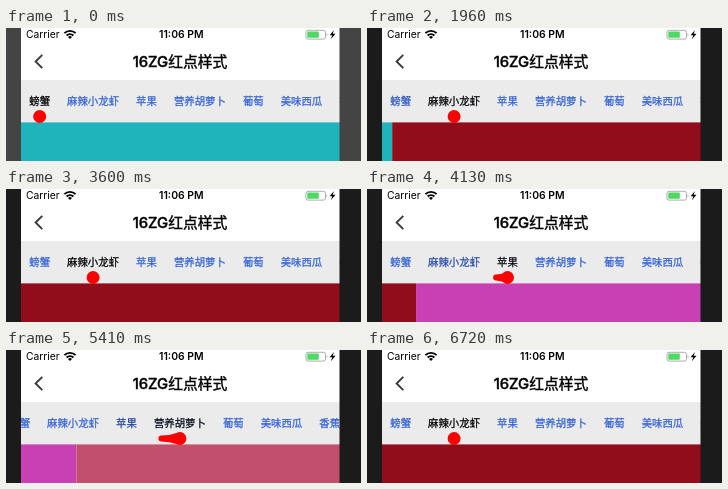
Animation, 355 px wide and 133 px high, one loop 7.26 s. Source, as an HTML page:

```html
<!DOCTYPE html>
<html lang="zh-CN">
<head>
<meta charset="utf-8">
<title>Tab dot</title>
<style>
html, body { margin: 0; width: 100%; height: 100%; overflow: hidden; }
svg { display: block; }
text { font-family: Inter, "Noto Sans CJK SC", "Noto Sans CJK JP", sans-serif; }
#tabs text { font-size: 10.4px; font-weight: 500; stroke-width: .25px; }
#title { font-size: 14.8px; font-weight: 500; stroke: #000; stroke-width: .4px; }
</style>
</head>
<body>
<svg width="355" height="133" viewBox="0 0 355 133">
  <rect width="355" height="133" fill="#fff"/>
  <rect x="15" y="52" width="319" height="43" fill="#ebebeb"/>
  <g id="pages"></g>
  <g id="tabs"></g>
  <path id="dot" fill="#f00"/>

  <text x="20" y="10.3" font-size="10.3">Carrier</text>
  <path d="M58.4 5.2a7.8 7.8 0 0 1 11.2 0M60.6 7.5a4.8 4.8 0 0 1 6.8 0"
    fill="none" stroke="#000" stroke-width="1.9"/>
  <path d="M64 11l-2-2.1a2.9 2.9 0 0 1 4 0z"/>
  <text x="175.3" y="10.3" font-size="10.4" font-weight="600" text-anchor="middle">11:06 PM</text>
  <rect x="300" y="2.3" width="19.5" height="8.8" rx="2" fill="#fff" stroke="#999" stroke-width=".8"/>
  <rect x="301.3" y="3.6" width="11.5" height="6.2" rx=".8" fill="#4cd964"/>
  <path d="M320.7 5.2q1.6 1.5 0 3z" fill="#999"/>
  <path d="M328 2l-4.4 5.2h2.7l-1.5 4 4.7-5.5h-2.8z"/>

  <path d="M36.3 26.8l-6.7 6.7 6.7 6.7" fill="none" stroke="#3a3a3a" stroke-width="1.9"/>
  <text id="title" x="174" y="39" text-anchor="middle">16ZG红点样式</text>

  <path id="sides" d="M0 0h15v133H0zM333.5 0H355v133h-21.5z"/>
</svg>
<script>
const LOOP = 7260, STEP = 30, LEFT = 15, WIDTH = 319, TOP = 94.4;
const DOT_Y = 88.5, R = 6.5, FONT = 10.4, GAP = 17;
const labels = ["螃蟹", "麻辣小龙虾", "苹果", "营养胡萝卜", "葡萄", "美味西瓜", "香蕉"];
const colors = ["#1fb4bb", "#920d1c", "#c840b4", "#c2506d"];

// Drags and releases: [start, end, position reached]
const swipes = [
  [1410, 1550, .508], [1745, 2020, 1],
  [2290, 2730, 1.365], [2730, 3180, 1],
  [3600, 3780, 1.389], [3915, 4250, 2],
  [4440, 4600, 2.5], [4755, 5080, 3],
  [5350, 5900, 2], [6210, 6700, 1]
];
const scrolls = [[5050, 5350, 20], [5850, 6080, 0]];

const $ = id => document.getElementById(id);
const clamp = v => Math.max(0, Math.min(1, v));
const easeOut = s => 1 - (1 - s) ** 2;
const follow = (moves, t) => moves.reduce((v, [start, end, to]) =>
  v + (to - v) * easeOut(clamp((t - start) / (end - start))), 0);

function add(parent, tag, attrs) {
  const el = document.createElementNS("http://www.w3.org/2000/svg", tag);
  for (const name in attrs) el.setAttribute(name, attrs[name]);
  return parent.appendChild(el);
}

colors.forEach((fill, i) =>
  add($("pages"), "rect", { x: LEFT + i * WIDTH, y: TOP, width: WIDTH, height: 40, fill }));

let x = 23.3;
const tabs = labels.map(label => {
  const el = add($("tabs"), "text", { x, y: 77.3 }), w = label.length * FONT;
  el.textContent = label;
  const center = x + w / 2;
  x += w + GAP;
  return { el, center };
});

// The head runs ahead in the first half, the tail catches up in the second
function dotPath(p) {
  const i = Math.floor(p), f = p - i;
  const from = tabs[i].center, span = tabs[i + 1].center - from;
  const head = from + span * clamp(2 * f);
  const tail = from + span * clamp(2 * f - 1);
  const r = R - 3.5 * clamp(3 * f), mid = (head + tail) / 2;
  const circle = (cx, r) =>
    `M${cx - r} ${DOT_Y}a${r} ${r} 0 0 1 ${2 * r} 0a${r} ${r} 0 0 1 ${-2 * r} 0z`;
  return circle(head, R) + circle(tail, r) +
    `M${tail} ${DOT_Y - r}Q${mid} ${DOT_Y - r} ${head} ${DOT_Y - R}` +
    `V${DOT_Y + R}Q${mid} ${DOT_Y + r} ${tail} ${DOT_Y + r}z`;
}

function draw(now) {
  const t = Math.floor(now % LOOP / STEP) * STEP;
  const p = follow(swipes, t), shift = `translate(${-follow(scrolls, t)})`;
  $("pages").setAttribute("transform", `translate(${-p * WIDTH})`);
  $("tabs").setAttribute("transform", shift);
  $("dot").setAttribute("transform", shift);
  $("dot").setAttribute("d", dotPath(p));
  $("sides").setAttribute("fill", t < 1440 ? "#444" : "#1b1b1b");
  tabs.forEach(({ el }, i) => {
    const blue = 1 - clamp(1 - Math.abs(p - i)) ** .7;
    const color = `rgb(${50 * blue},${98 * blue},${212 * blue})`;
    el.setAttribute("fill", color);
    el.setAttribute("stroke", color);
  });
}

const start = performance.now();
function tick() {
  draw(performance.now() - start);
  requestAnimationFrame(tick);
}
tick();
</script>
</body>
</html>
```
